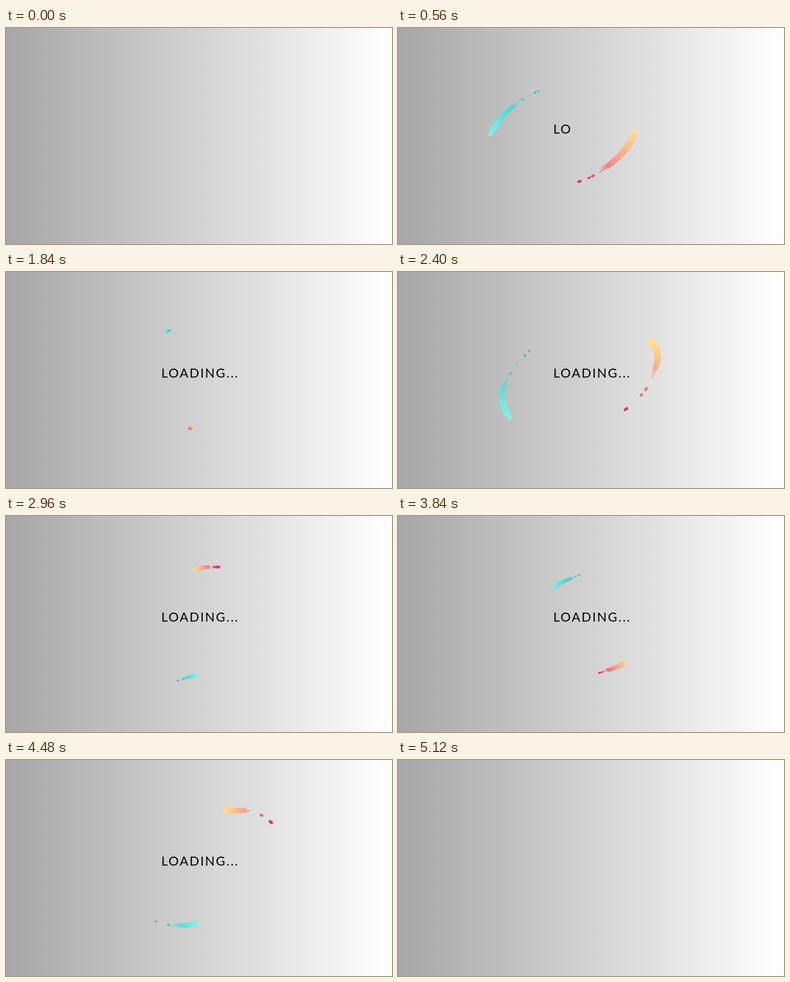
These frames come from a looping animation (640x360 px, 5200 ms). An HTML page with a canvas:

```html
<!DOCTYPE html>
<html lang="en">
<head>
<meta charset="utf-8">
<title>Loading</title>
<style>
  html, body { margin: 0; height: 100%; overflow: hidden; }
  canvas { display: block; background: linear-gradient(90deg, #a6a6a6, #fff); }
</style>
</head>
<body>
<canvas width="640" height="360"></canvas>
<script>
const ctx = document.querySelector('canvas').getContext('2d');
const LOOP = 5200, STEP = 80, CYCLE = 1710, START = 110;
const LABEL = 'LOADING...';

// Key times within one swirl; head, tail and last are positions along the path.
const TIMES = [0, 310, 500, 770, 950, 1140, 1580];
const HALF_WIDTH = [3.6, 4.6, 7, 6.2, 6, 4.4, 0];
const comets = [
  {
    path: [[-24, -82], [-75, -57], [-114, -18], [-134, 27], [-116, 72], [-80, 95], [-36, 97], [-14, 91], [10, 85]],
    head: [.25, 1, 3, 6, 6.75, 7.6, 8],
    tail: [0, .3, 1.3, 5, 5.35, 6.75, 8],
    last: [0, .1, .6, 3, 4.75, 6.2, 8],
    drops: [[0, 2.4], [.17, 3], [.5, 1.6], [.83, 3.2]],
    colors: ['#35bdb3', '#55d8cd', '#86f2ea'],
    width: .85
  },
  {
    path: [[4, 84], [53, 64], [104, 18], [124, -38], [106, -69], [72, -92], [36, -93], [12, -92], [-14, -84]],
    head: [.22, 1, 3, 6, 6.6, 7.6, 8],
    tail: [0, .25, 1.3, 4.7, 5.1, 6.4, 8],
    last: [0, .05, .6, 3.1, 4.2, 6, 8],
    drops: [[0, 4.2], [.5, 3.4], [.7, 4]],
    colors: ['#e5305f', '#f5968a', '#fde38f'],
    width: 1
  }
];

const lerp = (a, b, k) => a + (b - a) * k;

function keyed(values, u) {
  const i = Math.max(1, TIMES.findIndex(time => time > u));
  return lerp(values[i - 1], values[i], (u - TIMES[i - 1]) / (TIMES[i] - TIMES[i - 1]));
}

// Catmull-Rom point on a path
function pointAt(path, s) {
  const i = Math.min(Math.max(Math.floor(s), 0), path.length - 2), k = s - i;
  const at = n => path[Math.min(Math.max(n, 0), path.length - 1)];
  const [a, b, c, d] = [at(i - 1), at(i), at(i + 1), at(i + 2)];
  return [0, 1].map(j => b[j] + k / 2 * (c[j] - a[j] +
    k * (2 * a[j] - 5 * b[j] + 4 * c[j] - d[j] + k * (3 * (b[j] - c[j]) + d[j] - a[j]))));
}

function normalAt(path, s) {
  const [x0, y0] = pointAt(path, s - .02), [x1, y1] = pointAt(path, s + .02);
  const length = Math.hypot(x1 - x0, y1 - y0) || 1;
  return [(y0 - y1) / length, (x1 - x0) / length];
}

// Tapered ribbon along the path, thin at a and round at b
function ribbon(path, a, b, half, offset = 0) {
  const left = [], right = [];
  for (let i = 0; i <= 32; i++) {
    const k = i / 32, s = lerp(a, b, k);
    const w = half * Math.sqrt(k * (1 - k ** 5)) * 1.2;
    const [x, y] = pointAt(path, s), [nx, ny] = normalAt(path, s);
    left.push([x + nx * (offset + w), y + ny * (offset + w)]);
    right.unshift([x + nx * (offset - w), y + ny * (offset - w)]);
  }
  ctx.beginPath();
  for (const [x, y] of left.concat(right)) ctx.lineTo(x, y);
  ctx.fill();
}

function drop(path, s, size) {
  const [x, y] = pointAt(path, s), [nx, ny] = normalAt(path, s);
  ctx.beginPath();
  ctx.ellipse(x, y, size, size * .6, Math.atan2(-nx, ny), 0, 2 * Math.PI);
  ctx.fill();
}

function drawComet({ path, colors, drops, width, ...keys }, u) {
  const head = keyed(keys.head, u), tail = keyed(keys.tail, u), last = keyed(keys.last, u);
  const half = keyed(HALF_WIDTH, u) * width;
  const fill = ctx.createLinearGradient(...pointAt(path, last), ...pointAt(path, head));
  colors.forEach((color, i) => fill.addColorStop([0, .5, 1][i], color));
  ctx.fillStyle = fill;

  if (u < 100) return ribbon(path, tail, head, half);
  ribbon(path, lerp(tail, head, .12), head, half);
  [-.5, .05, .55].forEach((side, i) =>
    ribbon(path, lerp(tail, head, [.06, 0, .14][i]), lerp(tail, head, .6), half * .3, half * side));

  const grow = Math.min(1, u / 500) * Math.min(1, half / 4);
  drops.forEach(([k, size], i) => {
    const fades = drops.length > 3 ? i == 1 || i == 2 : i == 2;
    if (!fades || u < 860) drop(path, lerp(last, tail, k), size * grow);
  });
}

function draw(t) {
  ctx.clearRect(0, 0, 640, 360);
  const u = (t - START) % CYCLE;
  if (u >= 0 && u < 1580) {
    ctx.save();
    ctx.translate(269.4 + t * .0155, 178);
    comets.forEach(comet => drawComet(comet, u));
    ctx.restore();
  }
  if (t < 4560) {
    const typed = Math.max(0, Math.floor((t - 290) / 110));
    ctx.fillStyle = '#000';
    ctx.font = '21px Lato, sans-serif';
    ctx.letterSpacing = '2px';
    ctx.fillText(LABEL.slice(0, typed), 257.5, 175.5);
  }
}

const begin = performance.now();
function tick() {
  const t = (performance.now() - begin) % LOOP;
  draw(Math.floor(t / STEP) * STEP);
  requestAnimationFrame(tick);
}
tick();
</script>
</body>
</html>
```
